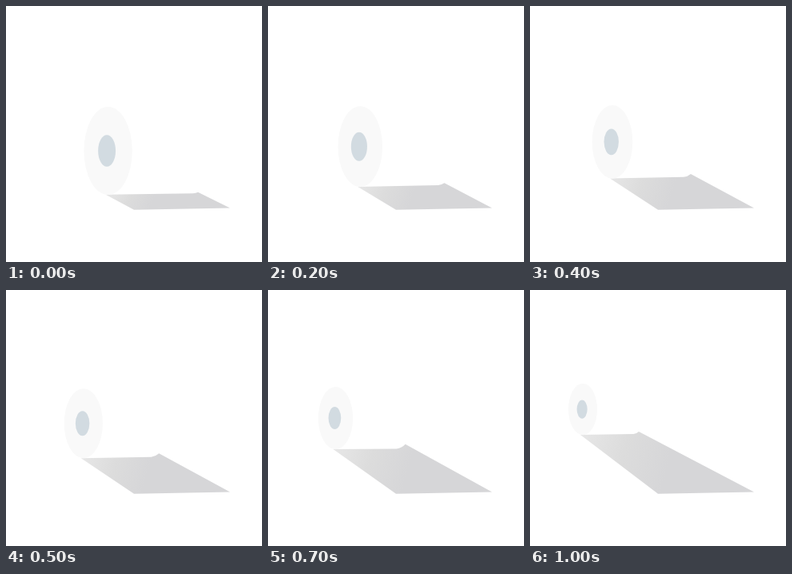
An HTML page with a canvas that plays this animation: 320 px wide and 320 px high, repeating every 1.5 s.

```html
<!DOCTYPE html>
<html>
<head>
<meta charset="utf-8">
<style>
html, body { margin: 0; width: 100%; height: 100%; overflow: hidden; background: #fff; }
canvas { display: block; width: 320px; height: 320px; }
</style>
</head>
<body>
<canvas width="320" height="320"></canvas>
<script>
const ctx = document.querySelector("canvas").getContext("2d");
const LOOP = 1500, STEP = 100, LAST = 10, RELEASE = 8;

const mix = (a, b, u) => a + (b - a) * u;

function oval(x, y, rx, ry, color) {
  ctx.fillStyle = color;
  ctx.beginPath();
  ctx.ellipse(x, y, rx, ry, 0, 0, Math.PI * 2);
  ctx.fill();
}

function drawPaper(left, top, cornerX, cornerY, lipW, lipH) {
  const shade = ctx.createLinearGradient(left, top, 175, top + 25);
  shade.addColorStop(0, "#e7e7e7");
  shade.addColorStop(0.5, "#dcdcdc");
  shade.addColorStop(1, "#d6d6d8");
  ctx.fillStyle = shade;
  ctx.beginPath();
  ctx.moveTo(left, top);
  ctx.lineTo(cornerX - lipW, cornerY + lipH);
  ctx.quadraticCurveTo(cornerX - lipW * 0.4, cornerY + lipH * 0.8, cornerX, cornerY);
  ctx.lineTo(280, 252.6);
  ctx.lineTo(160, 254.8);
  ctx.fill();
}

function draw(step) {
  const u = step / LAST;
  // The paper's far edge lifts gradually, then drops back at once.
  const lift = step < RELEASE ? step / (RELEASE - 1) : 0;
  const x = mix(127.6, 66, u);
  const y = mix(181, 149.1, u) + 6.8 * u * (1 - u);
  const rx = mix(30.2, 18, u), ry = mix(55, 32.2, u);

  ctx.clearRect(0, 0, 320, 320);
  drawPaper(x - 3, y + ry - 0.2,
    mix(240, 136, u) + 4.5 * lift, mix(232.8, 177, u) - lift,
    6.5 + 4.5 * lift, mix(1.4, 3, u) + 3.3 * lift);
  oval(x, y, rx, ry, "#f9f9f9");
  oval(x - rx * 0.05, y, rx * 0.363, ry * 0.358, "#d2dbe1");
}

function frame() {
  const t = performance.now() % LOOP;
  draw(Math.min(LAST, Math.floor(t / STEP)));
  requestAnimationFrame(frame);
}
frame();
</script>
</body>
</html>
```
